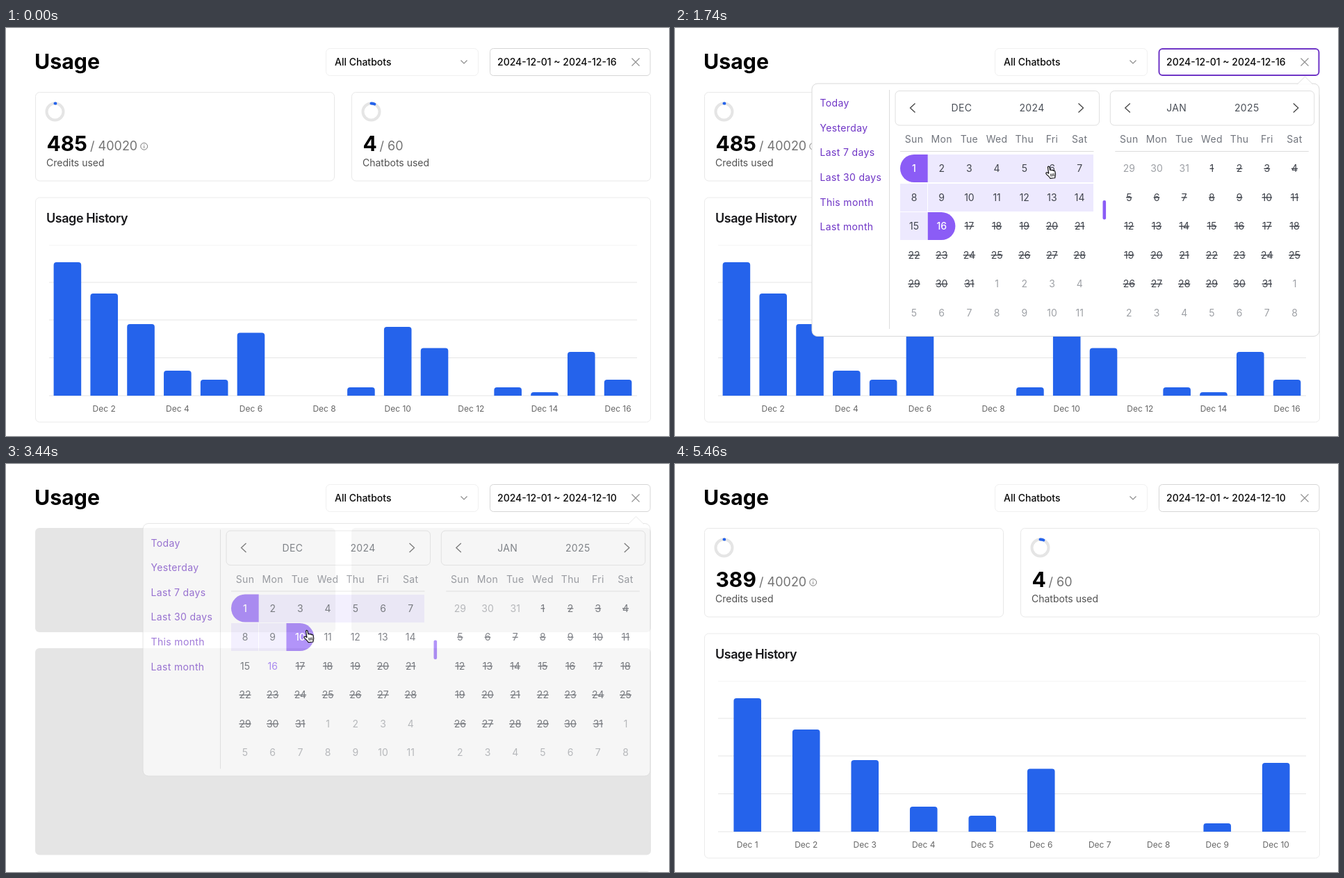
Write an HTML page that moves like this. It is 954 px wide and 587 px high and loops after 5650 ms.

```html
<!DOCTYPE html>
<html lang="en">
<head>
<meta charset="utf-8">
<title>Usage dashboard</title>
<style>
  html, body { margin: 0; width: 100%; height: 100%; overflow: hidden; background: #fff; }
  svg { display: block; width: 954px; height: 587px; font-family: Inter, Roboto, sans-serif; font-size: 14px; }
  text { white-space: pre; }
  .mid { text-anchor: middle; }
  .wide { letter-spacing: .025em; }
  .struck { text-decoration: line-through; }
</style>
</head>
<body>
<svg id="stage" viewBox="0 0 954 587"></svg>
<script>
const LOOP = 5650;
const BLUE = '#2563eb', VIOLET = '#8b5cf6', LINK = '#6f35c6', LINE = '#e5e5e5';

// Moments at which the picture is refreshed: [first, last, count]
const REFRESH = [
  [0, 0, 1], [170, 680, 7], [780, 1040, 4], [1210, 1210, 1], [1270, 1740, 6], [1820, 1820, 1],
  [1970, 2310, 5], [2390, 2480, 2], [2650, 2950, 4], [3060, 3160, 2], [3260, 3440, 3],
  [3540, 3740, 3], [3870, 3870, 1], [3920, 4410, 6], [4510, 4510, 1], [5070, 5270, 3]
].flatMap(([a, b, n]) => Array.from({ length: n }, (_, i) => [Math.round(a + (b - a) * i / Math.max(1, n - 1))]));

// Pointer path: [time, x, y, shape]
const POINTER = [
  [0, 590, 610, 'arrow'], [85, 590, 600, 'arrow'], [340, 690, 400, 'arrow'], [510, 810, 140, 'arrow'],
  [595, 848, 64, 'beam'], [680, 859, 54, 'beam'], [1125, 859, 54, 'beam'], [1210, 858, 66, 'beam'],
  [1270, 850, 82, 'arrow'], [1440, 740, 140, 'arrow'], [1610, 598, 185, 'hand'], [1820, 500, 208, 'hand'],
  [1900, 500, 208, 'hand'], [2140, 400, 222, 'hand'], [2310, 358, 221.5, 'hand'], [2480, 352, 212, 'hand'],
  [2650, 353, 212, 'hand'], [2950, 419.5, 230.5, 'hand'], [3160, 432.5, 239.5, 'hand'],
  [3920, 432.5, 239.5, 'arrow'], [4250, 500, 212, 'arrow'], [4510, 535, 198, 'arrow'],
  [4990, 535, 198, 'arrow'], [5070, 544, 250, 'arrow'], [5270, 578, 600, 'arrow'], [LOOP, 578, 610, 'arrow']
];

// Selected range in December: [time, last day, has end cap]
const RANGE = [[0, 16, true], [2650, 1, false], [2750, 2, true], [2850, 9, true], [2950, 9, false], [3060, 10, true]];

const BAR_TOPS = [337, 382, 426, 493, 506, 438.5, 529, 529, 517, 430, 460.5, 529, 517, 524, 466, 506];
const BASE = 529;

const clamp = v => Math.max(0, Math.min(1, v));
const ramp = (t, from, span) => clamp((t - from) / span);
const indexAt = (table, t) => table.findLastIndex(row => row[0] <= t);
const at = (table, t) => table[indexAt(table, t)];

const text = (x, y, s, fill, more = '') => `<text x="${x}" y="${y}" fill="${fill}" ${more}>${s}</text>`;
const path = (d, stroke, width = 1, more = '') =>
  `<path d="${d}" fill="none" stroke="${stroke}" stroke-width="${width}" ${more}/>`;
const box = (x, y, w, h, stroke, width = 1, r = 6, fill = '#fff') =>
  `<rect x="${x}" y="${y}" width="${w}" height="${h}" rx="${r}" fill="${fill}" stroke="${stroke}" stroke-width="${width}"/>`;
const group = (more, body) => `<g ${more}>${body}</g>`;

function header(t) {
  const focused = t >= 780 && t < 2650;
  const caretOn = focused && (t - 780) % 1000 < 500;
  return text(41, 59, 'Usage', '#000', 'font-size="30.3" font-weight="700"')
    + box(460.5, 29.5, 219, 39, '#f0f0f0')
    + text(473, 54, 'All Chatbots', '#0a0a0a', 'font-weight="500"')
    + path('M654.5 46.5l4.5 4.5 4.5-4.5', '#8a8a8a', 1.1)
    + (focused ? box(696.5, 30, 230, 38, LINK, 2, 5) : box(696.5, 29.5, 230.5, 39, '#d6d6d6', 1, 5))
    + text(707, 54, '2024-12-01 ~ 2024-12-' + (t < 3260 ? 16 : 10), '#0a0a0a', 'font-weight="500"')
    + path('M900.5 43.5l11 11m0-11l-11 11', '#8f8f8f', 1.1)
    + (caretOn ? path('M877.5 41v16', '#111') : '');
}

function statCard(x, value, total, label, totalX, shown, share) {
  const cx = x + 28, round = 2 * Math.PI * 12;
  const arc = share > 0
    ? `<circle cx="${cx}" cy="120.5" r="12" fill="none" stroke="${BLUE}" stroke-width="4" stroke-linecap="round"
        stroke-dasharray="${share * round} ${round}" transform="rotate(-90 ${cx} 120.5)"/>` : '';
  return box(x, 92.5, 430, 127.5, '#e8e8e8')
    + `<circle cx="${cx}" cy="120.5" r="12" fill="none" stroke="${LINE}" stroke-width="4"/>` + arc
    + text(x + 16, 176.5, value, '#000', 'font-size="30" font-weight="700"')
    + text(totalX, 176, '/ ' + total, '#737373', 'font-size="18"')
    + text(x + 15.5, 199, label, '#525252');
}

function chart(days, grow) {
  const step = 845 / days;
  let out = box(42.5, 244, 885, 323, '#ebebeb')
    + text(58, 279.5, 'Usage History', '#18181b', 'font-size="18" font-weight="600" letter-spacing="-.45"')
    + path('M62 312.5H908', '#f5f5f5');
  for (const y of [366, 420, 474.5, BASE]) out += path(`M62 ${y}H908`, LINE);
  for (let i = 0; i < days; i++) {
    const cx = 62 + step * (i + .5), h = (BASE - BAR_TOPS[i]) * grow, r = Math.min(4, h);
    if (h > 0) out += `<path fill="${BLUE}" d="M${cx - 19.8} ${BASE}v${r - h}q0 ${-r} ${r} ${-r}h${39.6 - 2 * r}q${r} 0 ${r} ${r}v${h - r}z"/>`;
    if (days < 16 || i % 2) out += text(cx, 552, 'Dec ' + (i + 1), '#666', 'class="mid" font-size="12"');
  }
  return out;
}

function dashboard(t) {
  const updated = t >= 3870;
  const grow = updated ? 1 - (1 - ramp(t, 3870, 540)) ** 3 : 1;
  const credits = updated ? 389 : 485;
  return statCard(42.5, credits, 40020, 'Credits used', 121, true, credits / 40020 * grow)
    + `<circle cx="198.7" cy="170.3" r="4.9" fill="none" stroke="#777"/>`
    + path('M198.7 169.6v3.2M198.7 167.4v1.1', '#777')
    + statCard(497.5, 4, 60, 'Chatbots used', 537.5, true, 4 / 60 * grow)
    + chart(updated ? 10 : 16, grow);
}

function skeleton(t) {
  const block = (x, y, w, h) => `<rect x="${x}" y="${y}" width="${w}" height="${h}" rx="6" fill="${LINE}"/>`;
  return group(`opacity="${1 - .12 * ramp(t, 3440, 430)}"`,
    block(42, 92, 432, 150) + block(497, 92, 431, 150) + block(42, 265, 886, 297.5) + block(42, 586, 886, 150));
}

const COL = 39.7, ROW = 41.5;

function rangeCells(left, [, last, cap]) {
  let out = '';
  for (let day = 1; day <= last; day++) {
    const c = (day - 1) % 7, r = Math.floor((day - 1) / 7);
    const x = left + c * COL, y = 182 + r * ROW;
    if (day === 1) {
      out += last === 1
        ? `<circle cx="${x + 20}" cy="202" r="20" fill="${VIOLET}"/>`
        : `<path fill="${VIOLET}" d="M${x + COL} ${y}h-19.7a20 20 0 0 0 0 40h19.7z"/>`;
    } else if (day === last && cap) {
      out += `<path fill="${VIOLET}" d="M${x} ${y}h19.7a20 20 0 0 1 0 40h-19.7z"/>`;
    } else {
      out += `<rect x="${x}" y="${y}" width="${c ? COL : 39.2}" height="40" fill="#ede9fe" shape-rendering="crispEdges"/>`;
    }
  }
  return out;
}

function calendar(left, month, year, lead, range) {
  const mid = 'class="mid wide"';
  let out = box(left - 7, 90.5, 293.5, 49.5, '#dfdfdf')
    + path(`M${left + 21.5} 108.5l-7 6.5 7 6.5`, '#444', 1.3)
    + path(`M${left + 256.5} 108.5l7 6.5-7 6.5`, '#444', 1.3)
    + text(left + 88.5, 120, month, '#4b5058', mid)
    + text(left + 189.5, 120, year, '#4b5058', mid)
    + path(`M${left} 177.5h278.5`, '#dcdcdc');
  ['Sun', 'Mon', 'Tue', 'Wed', 'Thu', 'Fri', 'Sat'].forEach((name, c) => {
    out += text(left + 20 + c * COL, 165, name, '#70747c', mid);
  });
  if (range) out += rangeCells(left, range);
  for (let i = 0; i < 42; i++) {
    const n = i - lead + 1, inside = n > 0 && n < 32;
    const selected = range && inside && (n === 1 || (n === range[1] && range[2]));
    const struck = inside && (!range || n > 16);
    const fill = !inside ? '#9ea1a6' : selected ? '#fff' : range && n === 16 ? VIOLET : '#41454d';
    out += text(left + 20 + i % 7 * COL, 207 + Math.floor(i / 7) * ROW, (n + 30) % 31 + 1, fill,
      `class="mid${struck ? ' struck' : ''}" font-weight="${selected ? 500 : 400}"`);
  }
  return out;
}

function popover(t) {
  const shown = Math.min(ramp(t, 780, 260), 1 - ramp(t, 3340, 290));
  if (!shown) return '';
  const links = ['Today', 'Yesterday', 'Last 7 days', 'Last 30 days', 'This month', 'Last month'];
  return group(`opacity="${shown}" transform="translate(0 ${16 * (1 - shown)})"`,
    box(197, 80, 730, 363.5, '#d9d9d9', 1, 8)
    + '<path d="M895.5 80.8L906.5 70l11 10.8" fill="#fff" stroke="#dedede"/>'
    + links.map((s, i) => text(208.5, 113 + i * 35.65, s, LINK, 'class="wide"')).join('')
    + path('M308.5 89V433', '#dcdcdc')
    + calendar(324, 'DEC', 2024, 0, at(RANGE, t))
    + `<rect x="615.5" y="248" width="4.6" height="27.5" rx="2" fill="${VIOLET}"/>`
    + calendar(633.3, 'JAN', 2025, 3));
}

const SHAPES = {
  arrow: '<path d="M0 0V15.5L3.6 12.2 6 17.7 8.5 16.6 6.1 11.2H11z" fill="#000" stroke="#fff"/>',
  beam: ['#fff', '#222'].map((color, i) =>
    path('M-3.5-8.5Q0-8.5 0-6V6Q0 8.5-3.5 8.5M3.5-8.5Q0-8.5 0-6M0 6Q0 8.5 3.5 8.5M-2 2.5h4', color, i ? 1.4 : 3)).join(''),
  hand: group('transform="translate(-4.5 -.5)" stroke="#111" stroke-width="1.2" stroke-linejoin="round"',
    '<path fill="#fff" d="M3.6 1.8C3.3.2 5.6-.1 6 1.5L7 6C7.3 5 9 5 9.3 6.2 9.8 5.4 11.4 5.5 11.7 6.8 12.3 6.1 13.7 6.4 13.9 7.6L14.6 11C15 13 14 14.4 13.8 17L7 17.6C6.3 15.6 3.6 13.6 1.6 11.6.2 10.2 1.4 8.6 2.9 9.2L4.9 10.4z"/>'
    + path('M7.8 11l.5 4M10 10.7l.4 4M12.2 10.4l.3 4', '#111', 1))
};

function pointer(t) {
  const i = indexAt(POINTER, t), [t0, x0, y0, shape] = POINTER[i];
  const [t1, x1, y1] = POINTER[Math.min(i + 1, POINTER.length - 1)];
  const k = ramp(t, t0, t1 - t0 || 1);
  return group(`transform="translate(${x0 + (x1 - x0) * k} ${y0 + (y1 - y0) * k})"`, SHAPES[shape]);
}

const stage = document.getElementById('stage');
const start = performance.now();
let drawn = -1;

function tick() {
  const [t] = at(REFRESH, (performance.now() - start) % LOOP);
  if (t !== drawn) {
    drawn = t;
    const loading = t >= 3350 && t < 3870;
    stage.innerHTML = header(t) + (loading ? skeleton(t) : dashboard(t)) + popover(t) + pointer(t);
  }
  requestAnimationFrame(tick);
}
tick();
</script>
</body>
</html>
```
